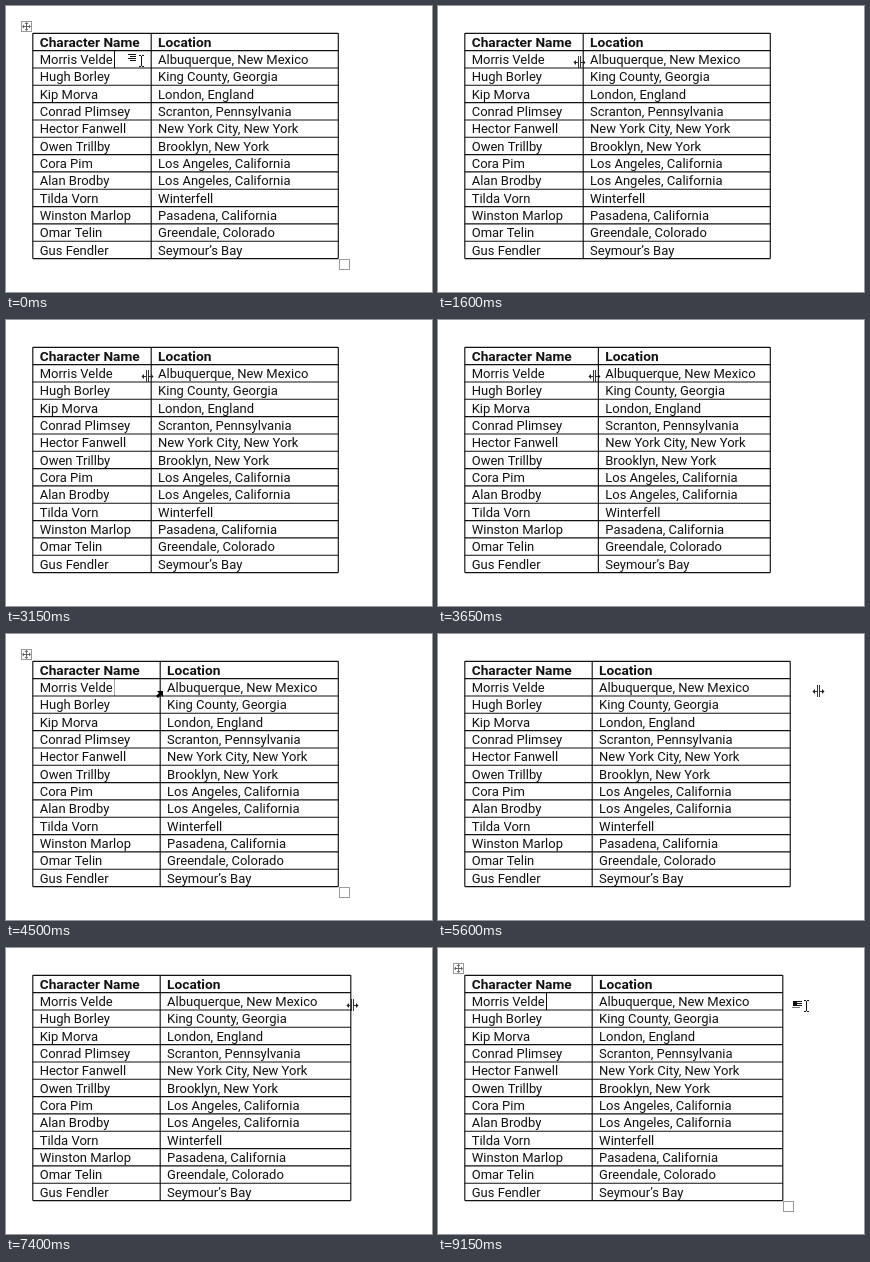
An HTML page with a canvas that plays this animation: 426x286 px, repeating every 9300 ms.

```html
<!DOCTYPE html>
<html lang="en">
<head>
<meta charset="utf-8">
<title>Resizing table columns</title>
<style>
  html, body { margin: 0; width: 100%; height: 100%; overflow: hidden; background: #fff; }
  canvas { display: block; }
</style>
</head>
<body>
<canvas id="stage" width="426" height="286"></canvas>
<script>
const ctx = document.getElementById('stage').getContext('2d');
const LOOP = 9300, STEP = 50;
const LEFT = 26.8, TOP = 27.3, ROW = 17.33, PAD = 6.9, BASELINE = 13.3, LINE = 16.3;
const INK = '#111';

const rows = [
  ['Character Name', 'Location'],
  ['Morris Velde', 'Albuquerque, New Mexico'],
  ['Hugh Borley', 'King County, Georgia'],
  ['Kip Morva', 'London, England'],
  ['Conrad Plimsey', 'Scranton, Pennsylvania'],
  ['Hector Fanwell', 'New York City, New York'],
  ['Owen Trillby', 'Brooklyn, New York'],
  ['Cora Pim', 'Los Angeles, California'],
  ['Alan Brodby', 'Los Angeles, California'],
  ['Tilda Vorn', 'Winterfell'],
  ['Winston Marlop', 'Pasadena, California'],
  ['Omar Telin', 'Greendale, Colorado'],
  ['Gus Fendler', 'Seymour’s Bay']
];

// Eased progress from 0 to 1 between two times.
function glide(t, from, to) {
  const u = Math.min(1, Math.max(0, (t - from) / (to - from)));
  return u * u * (3 - 2 * u);
}

const splitAt = t => 145.2
  + 25 * (glide(t, 1600, 2050) - glide(t, 2300, 2950))
  + 25 * glide(t, 3450, 3800) - 16 * glide(t, 3800, 4200);

const rightAt = t => 332.3 + 53 * glide(t, 5350, 5950) - 40.5 * glide(t, 6350, 6800);

function pointerAt(t) {
  if (t < 1100) {
    const away = glide(t, 50, 600);
    return { x: 135 + 85 * away - 79 * glide(t, 800, 1100), y: 55, kind: away < 0.2 ? 'beamRight' : 'beam' };
  }
  if (t < 4350) return { x: splitAt(t) - 4, y: 56, kind: 'resize' };
  if (t < 5350) {
    const x = 154 + 115 * glide(t, 4500, 4650) + 64 * glide(t, 4800, 5200);
    const kind = t < 4550 ? 'select' : t < 5150 ? 'beam' : 'resize';
    return { x, y: 60 - 4 * glide(t, 4500, 4650), kind };
  }
  // The dragged outer edge trails the hand.
  const x = rightAt(t + 225) + 1 + 22 * glide(t, 7500, 8050);
  return { x, y: 57 + glide(t, 7500, 8050), kind: t < 7500 ? 'resize' : 'beamBlock' };
}

function caretAlpha(t) {
  const restart = t < 1600 ? 0 : t < 5350 ? 3550 : 8000;
  const phase = Math.max(0, t - restart) % 1300;
  return 1 - glide(phase, 250, 500) + glide(phase, 850, 1100);
}

function rect(x, y, w, h, color = INK) {
  ctx.fillStyle = color;
  ctx.fillRect(x, y, w, h);
}

function polygon(points, color = '#000') {
  ctx.fillStyle = color;
  ctx.beginPath();
  points.forEach(([x, y]) => ctx.lineTo(x, y));
  ctx.fill();
}

function line(x1, y1, x2, y2) {
  ctx.strokeStyle = INK;
  ctx.lineWidth = 1.15;
  ctx.beginPath();
  ctx.moveTo(x1, y1);
  ctx.lineTo(x2, y2);
  ctx.stroke();
}

function wrap(text, width) {
  const lines = [''];
  for (const word of text.split(' ')) {
    const last = lines.length - 1;
    const joined = lines[last] ? lines[last] + ' ' + word : word;
    if (lines[last] && ctx.measureText(joined).width > width) lines.push(word);
    else lines[last] = joined;
  }
  return lines;
}

function drawTable(split, right) {
  const edges = [LEFT, split, right];
  let y = TOP;
  line(LEFT, y, right, y);
  rows.forEach((cells, i) => {
    ctx.font = i ? '13px Roboto, sans-serif' : 'bold 13.7px Roboto, sans-serif';
    const texts = cells.map((cell, c) => wrap(cell, edges[c + 1] - edges[c] - 12));
    ctx.fillStyle = INK;
    texts.forEach((lines, c) => lines.forEach((text, n) =>
      ctx.fillText(text, edges[c] + PAD, y + BASELINE + n * LINE)));
    y += ROW + LINE * (Math.max(...texts.map(lines => lines.length)) - 1);
    line(LEFT, y, right, y);
  });
  edges.forEach(x => line(x, TOP, x, y));
  return y;
}

function drawHandles(right, bottom) {
  ctx.strokeStyle = '#9a9a9a';
  ctx.lineWidth = 1;
  ctx.strokeRect(15.5, 15.5, 10, 10);
  ctx.strokeRect(Math.floor(right) + 1.5, Math.floor(bottom) + 1.5, 10, 10);
  ctx.save();
  ctx.translate(20.5, 20.5);
  for (let i = 0; i < 4; i++) {
    rect(-0.5, -3.5, 1, 4, '#666');
    polygon([[-2, -2.5], [0, -4.5], [2, -2.5]], '#666');
    ctx.rotate(Math.PI / 2);
  }
  ctx.restore();
}

const pointers = {
  beam() {
    rect(0, -5, 1, 10);
    for (const y of [-6, 5]) {
      rect(-2, y, 2, 1);
      rect(1, y, 2, 1);
    }
  },
  beamRight() {
    pointers.beam();
    for (let i = 0; i < 4; i++) rect(-13 + i % 2 * 2, -7 + i * 2, 8 - i % 2 * 2, 1);
  },
  beamBlock() {
    pointers.beam();
    rect(-13, -5, 4, 5);
    for (let y = -5; y < 0; y += 2) rect(-9, y, 5, 1);
    rect(-14, 1, 8, 1, '#777');
  },
  resize() {
    for (const side of [-1, 1]) {
      rect(side, -6, 1, 12, '#333');
      rect(side * 3 - 1, 0, 3, 1, '#333');
      polygon([[side * 6 + 0.5, 0.5], [side * 3.5 + 0.5, -2], [side * 3.5 + 0.5, 3]], '#222');
    }
  },
  select() {
    polygon([[3, -3], [3, 3], [1, 1], [-2, 4], [-4, 2], [-1, -1], [-3, -3]]);
  }
};

function draw(t) {
  rect(0, 0, 426, 286, '#fff');
  const split = splitAt(t), right = rightAt(t);
  const bottom = drawTable(split, right);
  const dragging = (t >= 1600 && t < 4350) || (t >= 5350 && t < 7450);

  if (!dragging) {
    drawHandles(right, bottom);
    ctx.globalAlpha = caretAlpha(t);
    rect(108, 45, 1, 17);
    ctx.globalAlpha = 1;
  }
  if (t >= 1400 && t < 1600) {
    for (let y = 0; y < 286; y += 4) rect(Math.floor(split), y, 1, 2, '#555');
  }

  const pointer = pointerAt(t);
  ctx.save();
  ctx.translate(Math.round(pointer.x), Math.round(pointer.y));
  pointers[pointer.kind]();
  ctx.restore();
}

const start = performance.now();
function tick() {
  const t = (performance.now() - start) % LOOP;
  draw(Math.floor(t / STEP) * STEP);
  requestAnimationFrame(tick);
}
tick();
</script>
</body>
</html>
```
